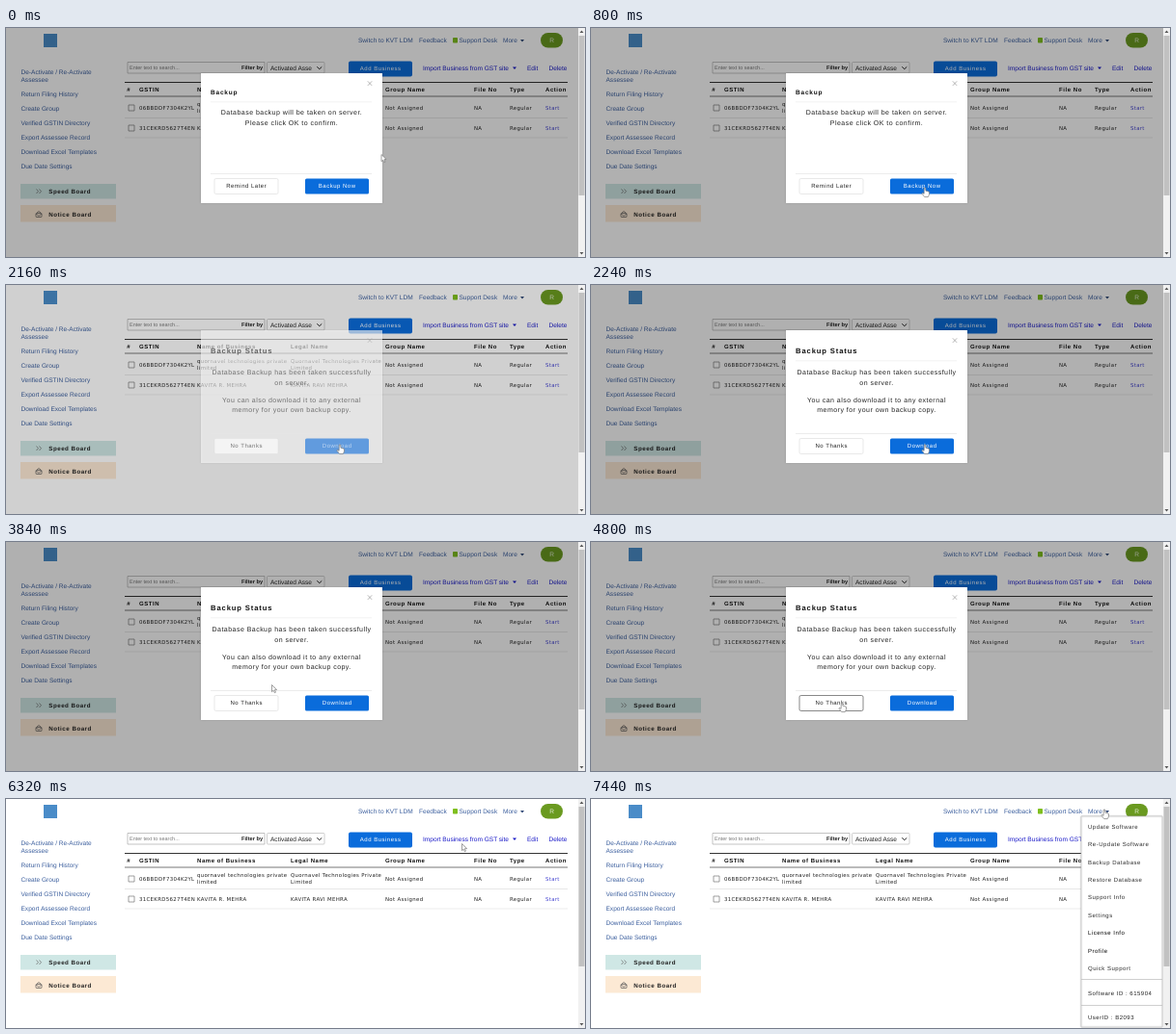
Write an HTML page with a canvas that moves like this. It is 600 px wide and 238 px high and loops after 8 s.

```html
<!DOCTYPE html>
<html lang="en">
<head>
<meta charset="utf-8">
<title>Backup walkthrough</title>
<style>
html, body { margin: 0; width: 100%; height: 100%; overflow: hidden; background: #fff; }
canvas { display: block; width: 600px; height: 238px; }
</style>
</head>
<body>
<canvas id="stage"></canvas>
<script>
const W = 600, H = 238, LOOP = 8000, STEP = 80;
const canvas = document.getElementById('stage');
const ctx = canvas.getContext('2d');
const ratio = window.devicePixelRatio || 1;
canvas.width = W * ratio;
canvas.height = H * ratio;

const LINK = '#3c5f9e', BLUE = '#1a1ac8', BUTTON = '#0a6cdb', INK = '#222';
const SANS = '"Liberation Sans", Arial, sans-serif';
const WIDE = '"DejaVu Sans", Verdana, sans-serif';

// Text styles: size, letter spacing, weight, family
const STYLES = {
  link: [6.55, 0, 400, SANS],
  small: [5.45, 0, 400, SANS],
  label: [5.7, 0, 700, SANS],
  head: [6, 0.55, 700, SANS],
  cell: [5.4, 0.32, 400, WIDE],
  side: [6.2, 0.5, 700, SANS],
  button: [6, 0.5, 400, SANS],
  body: [7, 0.47, 400, SANS],
  title: [6.5, 0.8, 700, SANS],
  bigTitle: [7.6, 0.9, 700, SANS]
};

// y is the vertical middle of the capitals
function text(str, x, y, style, color = INK, align = 'left') {
  const [size, gap, weight, family] = STYLES[style];
  ctx.font = `${weight} ${size}px ${family}`;
  ctx.letterSpacing = gap + 'px';
  ctx.fillStyle = color;
  ctx.textAlign = align;
  ctx.fillText(str, x, y + size * 0.35);
}

function rect(x, y, w, h, fill, stroke, r = 0) {
  ctx.beginPath();
  ctx.roundRect(x, y, w, h, r);
  if (fill) { ctx.fillStyle = fill; ctx.fill(); }
  if (stroke) { ctx.strokeStyle = stroke; ctx.lineWidth = 0.7; ctx.stroke(); }
}

function line(points, color, width = 1) {
  ctx.beginPath();
  points.forEach(([x, y]) => ctx.lineTo(x, y));
  ctx.strokeStyle = color;
  ctx.lineWidth = width;
  ctx.stroke();
}

function poly(points, fill, stroke) {
  ctx.beginPath();
  points.forEach(([x, y]) => ctx.lineTo(x, y));
  ctx.closePath();
  ctx.fillStyle = fill;
  ctx.fill();
  if (stroke) { ctx.strokeStyle = stroke; ctx.lineWidth = 0.7; ctx.stroke(); }
}

const caret = (x, y, color) => poly([[x - 2, y - 1], [x + 2, y - 1], [x, y + 1.4]], color);

function drawHeader() {
  rect(39, 6, 14, 14, '#4a8cc8');
  text('Switch to KVT LDM', 365, 12.5, 'link', LINK);
  text('Feedback', 428, 12.5, 'link', LINK);
  rect(463, 10, 5, 5.5, '#7fbf1e', null, 0.8);
  text('Support Desk', 469.5, 12.5, 'link', LINK);
  text('More', 515, 12.5, 'link', LINK);
  caret(535, 13, '#2d4675');
  rect(554, 5, 23, 15.5, '#6a9a20', null, 7.7);
  text('R', 565.6, 13, 'link', '#e4edd6', 'center');
}

function drawSidebar() {
  const items = [
    ['De-Activate / Re-Activate', 46], ['Assessee', 54], ['Return Filing History', 68.5],
    ['Create Group', 83.5], ['Verified GSTIN Directory', 98.5], ['Export Assessee Record', 113.5],
    ['Download Excel Templates', 128.5], ['Due Date Settings', 143.5]
  ];
  for (const [label, y] of items) text(label, 15.5, y, 'link', LINK);

  rect(15, 162, 99, 15.5, '#cfe7e5');
  for (const x of [31.5, 34.5]) line([[x, 167.5], [x + 2, 169.7], [x, 172]], '#666', 0.7);
  text('Speed Board', 44.3, 169.8, 'side');

  rect(15, 184, 99, 17.5, '#fce9d4');
  rect(31, 192.5, 6, 4, null, '#555', 0.6);
  line([[31, 193], [34, 195.3], [37, 193]], '#555', 0.7);
  line([[32, 192], [34, 190.5], [36, 192]], '#555', 0.7);
  text('Notice Board', 44.3, 193.8, 'side');
}

function drawToolbar() {
  rect(126, 35.5, 142, 11.5, '#fff', '#aaa');
  text('Enter text to search...', 128, 41.3, 'small', '#777');
  text('Filter by', 244, 41.5, 'label');
  rect(270.5, 35.5, 59.5, 11.5, '#fff', '#bbb', 1);
  text('Activated Asse', 274, 41.3, 'link');
  line([[322.3, 40.3], [324.8, 42.7], [327.3, 40.3]], '#222', 1);
  rect(355, 34.5, 66, 16, BUTTON, null, 2);
  text('Add Business', 388.2, 41.5, 'button', '#fff', 'center');
  text('Import Business from GST site', 432, 41.3, 'link', BLUE);
  caret(527, 41.5, BLUE);
  text('Edit', 540, 41.3, 'link', BLUE);
  text('Delete', 562.5, 41.3, 'link', BLUE);
}

function drawTable() {
  const cols = [125.3, 138, 198, 295, 393, 485, 522, 559];
  const heads = ['#', 'GSTIN', 'Name of Business', 'Legal Name', 'Group Name', 'File No', 'Type', 'Action'];
  line([[123, 56.5], [582, 56.5]], '#333', 1);
  line([[123, 71], [582, 71]], '#555', 0.8);
  line([[123, 93.5], [582, 93.5]], '#ddd', 0.7);
  line([[123, 114], [582, 114]], '#e4e4e4', 0.7);
  heads.forEach((h, i) => text(h, cols[i], 64, 'head', '#111'));

  const rows = [
    [83, '06BBDDF7304K2YL', ['quornavel technologies private', 'limited'],
      ['Quornavel Technologies Private', 'Limited']],
    [104, '31CEKRD5627T4EN', ['KAVITA R. MEHRA'], ['KAVITA RAVI MEHRA']]
  ];
  for (const [y, id, name, legal] of rows) {
    rect(127, y - 3, 6, 6, '#fff', '#777');
    text(id, cols[1], y + 0.3, 'cell');
    [name, legal].forEach((lines, c) => lines.forEach((s, i) =>
      text(s, cols[2 + c], y + (lines.length > 1 ? i * 7 - 3.5 : 0), 'cell')));
    text('Not Assigned', cols[4], y, 'cell');
    text('NA', cols[5], y, 'cell');
    text('Regular', cols[6], y, 'cell');
    text('Start', cols[7], y, 'cell', '#4444d0');
  }
}

function drawScrollbar() {
  rect(593, 0, 7, H, '#f1f1f1');
  rect(593.5, 8, 6, 166, '#c1c1c1');
  poly([[594.5, 5], [598.5, 5], [596.5, 2.5]], '#555');
  poly([[594.5, 233], [598.5, 233], [596.5, 235.5]], '#555');
}

function modalButton(x, y, label, fill, color, border) {
  rect(x, y, 66, 16, fill, border, 1.6);
  text(label, x + 33.2, y + 7.5, 'button', color, 'center');
}

function panel(height, title, style, titleY) {
  ctx.save();
  ctx.shadowColor = 'rgba(0,0,0,.15)';
  ctx.shadowBlur = 2 * ratio;
  rect(202, 47, 188, height, '#fff');
  ctx.restore();
  line([[374.8, 55.3], [379.2, 59.9]], '#999', 0.7);
  line([[379.2, 55.3], [374.8, 59.9]], '#999', 0.7);
  text(title, 212, titleY, style, '#111');
  const low = 47 + height - 30.5;
  line([[212, titleY + 10.5], [379, titleY + 10.5]], '#eee', 0.7);
  line([[212, low], [379, low]], '#e4e4e4', 0.7);
}

function drawConfirm(t) {
  panel(135, 'Backup', 'title', 66.3);
  text('Database backup will be taken on server.', 296, 87.8, 'body', INK, 'center');
  text('Please click OK to confirm.', 296, 98.5, 'body', INK, 'center');
  modalButton(216, 156.5, 'Remind Later', '#fff', INK, '#dedede');
  const busy = t >= 1200;
  modalButton(310, 156.5, busy ? 'Backing Up..' : 'Backup Now', t >= 1360 ? '#1d7fe2' : BUTTON, '#fff');
}

function drawStatus(t) {
  panel(138, 'Backup Status', 'bigTitle', 68.3);
  const lines = [
    ['Database Backup has been taken successfully', 91], ['on server.', 101.5],
    ['You can also download it to any external', 119.2], ['memory for your own backup copy.', 129.8]
  ];
  for (const [s, y] of lines) text(s, 296, y, 'body', INK, 'center');
  const hover = t >= 4160;
  modalButton(216, 159.5, 'No Thanks', '#fff', INK, hover ? '#555' : '#dedede');
  modalButton(310, 159.5, 'Download', BUTTON, '#fff');
}

function drawMenu() {
  ctx.save();
  ctx.shadowColor = 'rgba(0,0,0,.2)';
  ctx.shadowBlur = 2 * ratio;
  rect(508, 18, 84, 219, '#fff', '#c8c8c8');
  ctx.restore();
  const items = ['Update Software', 'Re-Update Software', 'Backup Database', 'Restore Database',
    'Support Info', 'Settings', 'License Info', 'Profile', 'Quick Support'];
  items.forEach((s, i) =>
    text(s, 515, 28.5 + i * 18.45, 'button', i === 6 || i === 7 ? '#000' : '#2c2c2c'));
  for (const y of [187.5, 214.5]) line([[508, y], [592, y]], '#bbb', 0.7);
  text('Software ID : 615904', 515, 202, 'button', '#222');
  text('UserID : B2093', 515, 227, 'button', '#222');
}

// Pointer tip: time, x, y
const PATH = [
  [0, 389, 131.5], [560, 389, 131.5], [800, 346, 166], [2880, 346, 166],
  [3280, 302, 143], [3600, 302, 143], [3840, 275.5, 148.5], [4160, 260, 167],
  [5680, 260, 167], [6000, 410, 86], [6080, 410, 86], [6560, 535, 7],
  [6880, 535, 7], [6960, 532, 11], [8000, 532, 11]
];

function pointerAt(t) {
  const i = Math.max(1, PATH.findIndex(p => p[0] >= t));
  const [t0, x0, y0] = PATH[i - 1], [t1, x1, y1] = PATH[i];
  const k = (t - t0) / (t1 - t0);
  return [x0 + (x1 - x0) * k, y0 + (y1 - y0) * k];
}

function drawPointer(t) {
  const [x, y] = pointerAt(t);
  const within = (a, b) => t >= a && t < b;
  const hand = within(800, 2960) || within(4080, 5760) || t >= 6560;
  const shape = hand
    ? [[-.7, 0], [.7, 0], [.9, 3.2], [4, 4], [4.6, 5], [4.3, 7.5], [3.3, 9.6], [-.3, 9.6],
       [-3, 6.3], [-2.6, 5.3], [-.9, 6.3]]
    : [[0, 0], [0, 7.2], [1.7, 5.7], [2.8, 8.2], [4, 7.7], [2.9, 5.2], [5.1, 5]];
  ctx.lineJoin = 'round';
  poly(shape.map(([a, b]) => [x + a, y + b]), '#fff', '#777');
}

function draw(t) {
  ctx.setTransform(ratio, 0, 0, ratio, 0, 0);
  ctx.textRendering = 'geometricPrecision';
  rect(0, 0, W, H, '#fff');
  drawHeader();
  drawSidebar();
  drawToolbar();
  drawTable();
  if (t < 5440) {
    ctx.globalAlpha = t >= 2160 && t < 2240 ? 0.6 : 1;
    rect(0, 0, 593, H, 'rgba(0,0,0,.31)');
    if (t < 2160) drawConfirm(t); else drawStatus(t);
    ctx.globalAlpha = 1;
  }
  if (t >= 7440) drawMenu();
  drawScrollbar();
  drawPointer(t);
}

const start = performance.now();
function tick() {
  const t = (performance.now() - start) % LOOP;
  draw(Math.floor(t / STEP) * STEP);
  requestAnimationFrame(tick);
}
tick();
</script>
</body>
</html>
```
